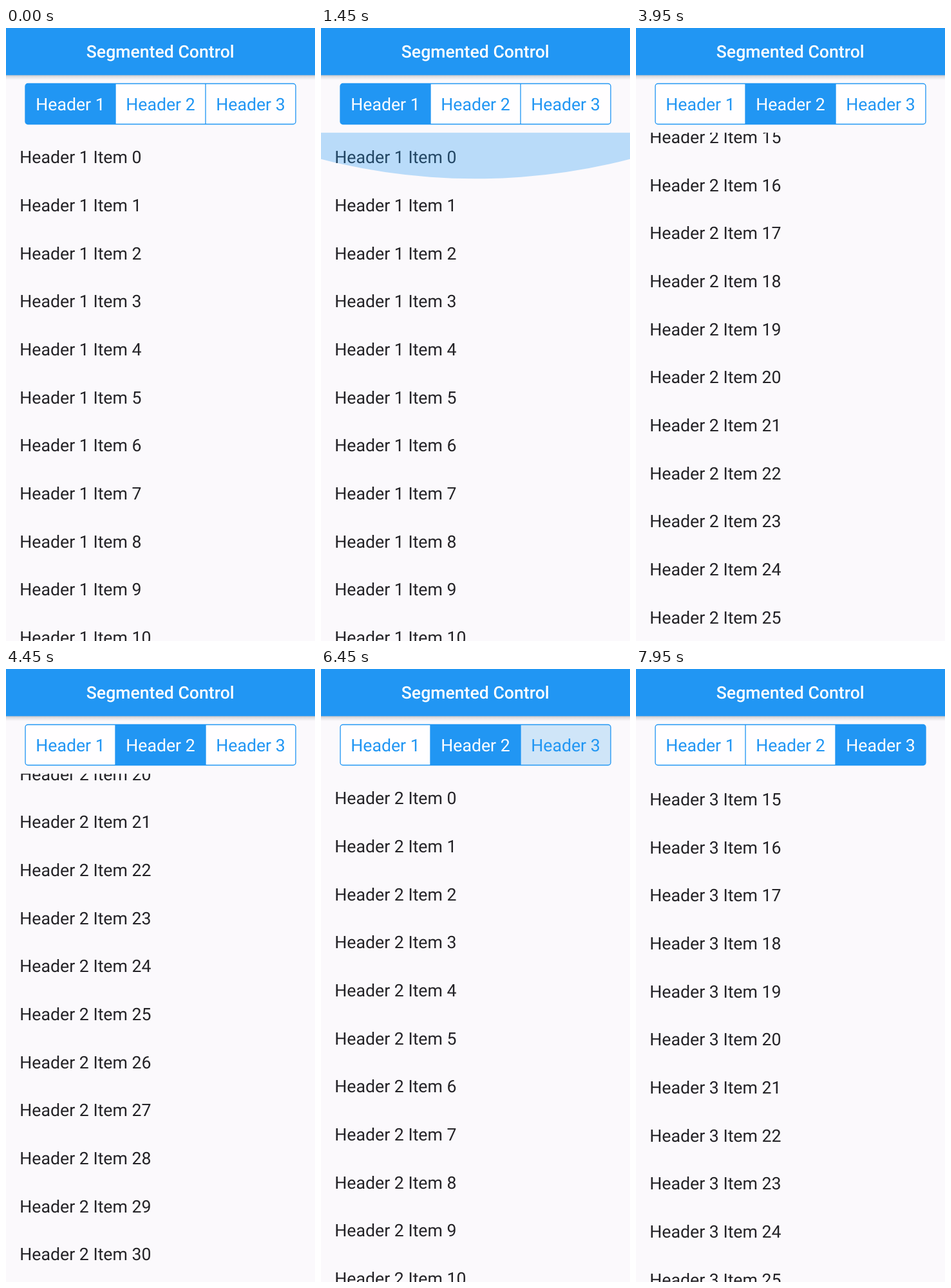
An HTML page for the animation above (8000 ms loop, 480x953 px).

```html
<!DOCTYPE html>
<html lang="en">
<head>
<meta charset="utf-8">
<title>Segmented Control</title>
<style>
  html, body { margin: 0; width: 100%; height: 100%; overflow: hidden; background: #fbf9fc; }
  svg { display: block; width: 100%; height: 100%; }
  text { font: 400 26.67px Roboto, sans-serif; text-rendering: geometricPrecision; }
  #title { font-weight: 500; fill: #fff; }
  #rows text { fill: #232226; }
</style>
</head>
<body>
<svg viewBox="0 0 480 953" preserveAspectRatio="none">
  <defs>
    <clipPath id="listClip"><rect y="162.67" width="480" height="791"/></clipPath>
    <clipPath id="barClip"><rect x="30" y="86.5" width="420" height="63" rx="4"/></clipPath>
    <linearGradient id="shade" x1="0" y1="0" x2="0" y2="1">
      <stop offset="0" stop-color="#000" stop-opacity=".22"/>
      <stop offset=".35" stop-color="#000" stop-opacity=".1"/>
      <stop offset="1" stop-color="#000" stop-opacity="0"/>
    </linearGradient>
  </defs>
  <rect width="480" height="953" fill="#fbf9fc"/>
  <g clip-path="url(#listClip)">
    <g id="rows"></g>
    <ellipse id="glow" cx="240" rx="720" fill="#2196f3"/>
  </g>
  <rect y="73" width="480" height="8" fill="url(#shade)"/>
  <rect width="480" height="73.3" fill="#2196f3"/>
  <text id="title" x="239.7" y="46" text-anchor="middle">Segmented Control</text>
  <g id="cells" clip-path="url(#barClip)"></g>
  <g fill="none" stroke="#2196f3" stroke-width="1.33">
    <rect x="30" y="86.5" width="420" height="63" rx="4"/>
    <path d="M170 86.5V149.5M310 86.5V149.5"/>
  </g>
  <g id="labels" text-anchor="middle"></g>
</svg>
<script>
const LOOP = 8000, ROW = 224 / 3, TOP = 162.67;
const BLUE = [33, 150, 243], WHITE = [255, 254, 255], PRESSED = [207, 229, 248];

// A press, then the release that selects the tab.
const taps = [
  { tab: 1, down: 2150, up: 2865 },
  { tab: 2, down: 5650, up: 6465 }
];
// Flings as [time, offset] knots.
const flings = [
  [[270, 0], [400, 150], [500, 500], [700, 1160], [900, 1462], [1030, 1520], [1100, 1200], [1230, 0]],
  [[3520, 0], [3650, 250], [3750, 620], [3950, 1149.7], [4200, 1480], [4430, 1560], [4520, 1200], [4658, 0]],
  [[6670, 0], [7200, 50], [7350, 194.6], [7600, 720], [7950, 1117.7], [8050, 1160]]
];
const hits = [1230, 4658];

const $ = id => document.getElementById(id);
const clamp = v => Math.max(0, Math.min(1, v));
const mix = (a, b, u) => `rgb(${a.map((v, i) => Math.round(v + (b[i] - v) * u))})`;

function add(parent, tag, attrs) {
  const el = document.createElementNS("http://www.w3.org/2000/svg", tag);
  for (const k in attrs) el.setAttribute(k, attrs[k]);
  return $(parent).appendChild(el);
}

const rows = Array.from({ length: 12 }, () => add("rows", "text", { x: 21.33 }));
const cells = [0, 1, 2].map(i => add("cells", "rect", { x: 30 + 140 * i, y: 86, width: 140, height: 65 }));
const labels = [0, 1, 2].map(i => {
  const el = add("labels", "text", { x: 100 + 140 * i, y: 128 });
  el.textContent = `Header ${i + 1}`;
  return el;
});

// Monotone cubic through the knots: no overshoot at the turns.
function spline(knots, t) {
  const n = knots.length - 1;
  if (t <= knots[0][0]) return knots[0][1];
  if (t >= knots[n][0]) return knots[n][1];
  const slope = i => (knots[i + 1][1] - knots[i][1]) / (knots[i + 1][0] - knots[i][0]);
  const tangent = i => {
    if (i === 0) return 0;
    if (i === n) return slope(n - 1);
    const a = slope(i - 1), b = slope(i);
    return a * b <= 0 ? 0 : 2 * a * b / (a + b);
  };
  let i = 0;
  while (t > knots[i + 1][0]) i++;
  const [t0, y0] = knots[i], [t1, y1] = knots[i + 1];
  const h = t1 - t0, u = (t - t0) / h, v = 1 - u;
  return v * v * (1 + 2 * u) * y0 + u * u * (3 - 2 * u) * y1
    + h * u * v * (v * tangent(i) - u * tangent(i + 1));
}

function drawGlow(t) {
  let size = 0, alpha = 0;
  for (const hit of hits) {
    const age = t - hit;
    if (age < 0 || age > 738) continue;
    if (age < 138) {
      size = 1 - (1 - age / 138) ** 2;
      alpha = .3 + .11 * size;
    } else {
      size = (1 - (age - 138) / 600) ** 2;
      alpha = .41 * size;
    }
  }
  const glow = $("glow");
  glow.setAttribute("cy", TOP + (96.5 - 720) * size);
  glow.setAttribute("ry", 720 * size);
  glow.setAttribute("opacity", alpha);
}

function drawTabs(t) {
  const level = [1, 0, 0], base = [WHITE, WHITE, WHITE];
  let tab = 0;
  for (const tap of taps) {
    if (t < tap.down) continue;
    if (t < tap.up + 165) base[tap.tab] = PRESSED;
    if (t < tap.up) continue;
    const u = clamp((t - tap.up) / 165);
    level[tab] = 1 - u;
    level[tap.tab] = u;
    tab = tap.tab;
  }
  cells.forEach((c, i) => c.setAttribute("fill", mix(base[i], BLUE, level[i])));
  labels.forEach((l, i) => l.setAttribute("fill", mix(BLUE, WHITE, level[i])));
  return tab;
}

function draw(t) {
  const tab = drawTabs(t);
  const offset = spline(flings[tab], t);
  const first = Math.floor(offset / ROW);
  rows.forEach((row, i) => {
    const n = first + i;
    row.textContent = `Header ${tab + 1} Item ${n}`;
    // Baselines sit on whole pixels.
    row.setAttribute("y", Math.round(210.3 + n * ROW - offset));
  });
  drawGlow(t);
}

const start = performance.now();
function tick() {
  draw((performance.now() - start) % LOOP);
  requestAnimationFrame(tick);
}
tick();
</script>
</body>
</html>
```
